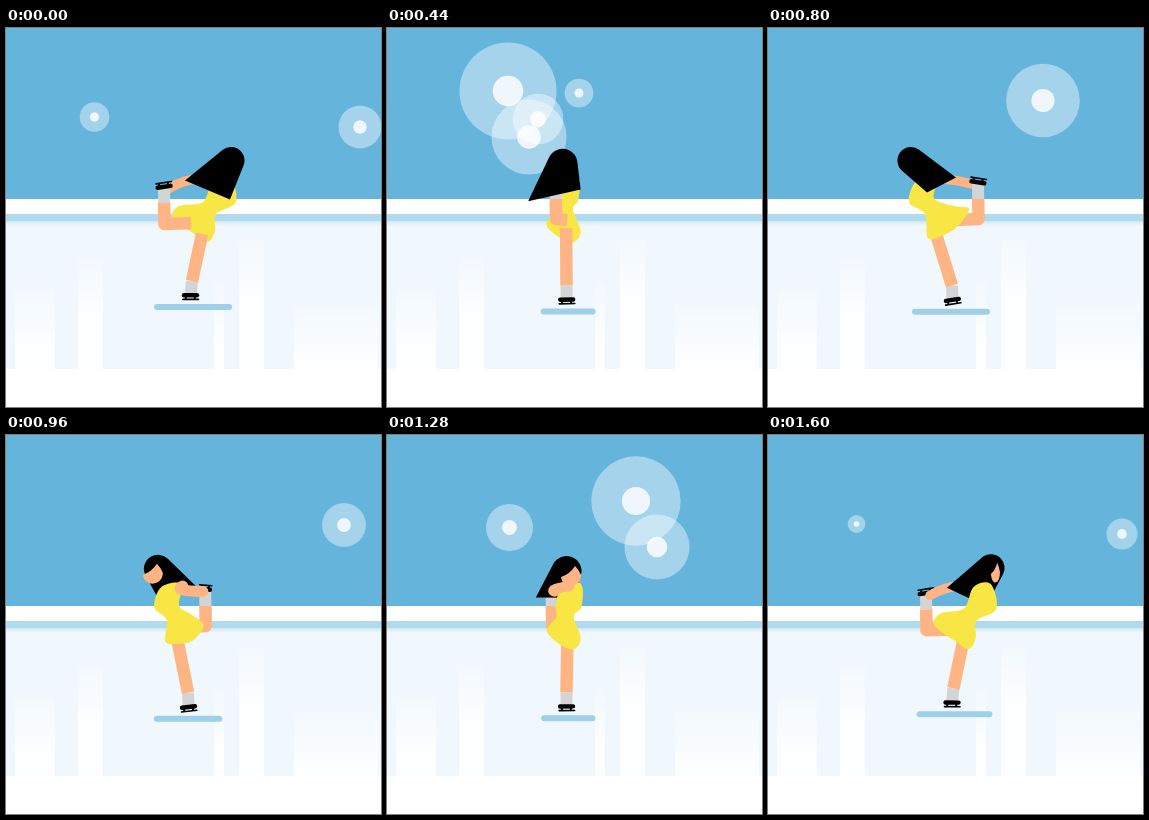
An HTML page with a canvas that plays this animation: 375x379 px, repeating every 1640 ms.

```html
<!DOCTYPE html>
<html lang="en">
<head>
<meta charset="utf-8">
<title>Skater spin</title>
<style>
  html, body { margin: 0; width: 100%; height: 100%; overflow: hidden; background: #fff; }
  canvas { display: block; width: 375px; height: 379px; }
</style>
</head>
<body>
<canvas id="stage" width="375" height="379"></canvas>
<script>
const ctx = document.getElementById('stage').getContext('2d');
const W = 375, H = 379, LOOP = 1640, STEP = 40;
const SKIN = '#ffb484', DRESS = '#f8e644', SOCK = '#d3d4d5', BLACK = '#000';

// Key moments of the spin: time, body lean, side of the raised leg
// (both -1 left to 1 right), right hair tip x, left hair tip x and y from the head.
const KEYS = [
  [0, 1, -1, -1, -46, 20],
  [240, .24, -1, 10, -28, 33],
  [600, -.54, 0, 26, -39, 39],
  [800, -1, 1, 45, 16, 32],
  [1160, -.3, -.3, 26, -24, 35],
  [1400, .12, -1, -8, -36, 18],
  [1600, .95, -1, -5, -44, 20]
];

// Flashes: x, y, start time. All grow alike.
const LIGHTS = [
  [88.5, 89, 1540], [354, 99, 1495], [282, 110, 78], [121, 63, 112],
  [142, 109, 186], [151, 91, 269], [192, 65, 343], [275, 72.5, 551],
  [338, 90, 812], [249, 66, 978], [270, 112, 1060], [122.5, 92.5, 1121]
];
const GROWTH = .148, MAX_R = 51;

const N = KEYS.length;
const span = i => (KEYS[(i + 1) % N][0] - KEYS[i][0] + LOOP) % LOOP;
const slope = (i, k) => (KEYS[(i + 1) % N][k] - KEYS[i][k]) / span(i);

// Tangent that never overshoots a neighbouring key.
function tangent(i, k) {
  const a = slope((i + N - 1) % N, k), b = slope(i, k);
  return a * b > 0 ? 2 * a * b / (a + b) : 0;
}

function sample(t) {
  let i = N - 1;
  while (KEYS[i][0] > t) i--;
  const j = (i + 1) % N, h = span(i), u = (t - KEYS[i][0]) / h;
  const u2 = u * u, u3 = u2 * u, s = 3 * u2 - 2 * u3;
  return KEYS[i].map((v, k) => v + (KEYS[j][k] - v) * s +
    h * ((u3 - 2 * u2 + u) * tangent(i, k) + (u3 - u2) * tangent(j, k)));
}

function rect(x, y, w, h, fill) {
  ctx.fillStyle = fill;
  ctx.fillRect(x, y, w, h);
}

function disc(x, y, r, fill) {
  ctx.fillStyle = fill;
  ctx.beginPath();
  ctx.arc(x, y, r, 0, 2 * Math.PI);
  ctx.fill();
}

function line(pts, width, color, cap = 'butt') {
  ctx.strokeStyle = color;
  ctx.lineWidth = width;
  ctx.lineCap = cap;
  ctx.lineJoin = 'round';
  ctx.beginPath();
  for (let i = 0; i < pts.length; i += 2) ctx.lineTo(pts[i], pts[i + 1]);
  ctx.stroke();
}

function fade(y0, y1, from, to) {
  const g = ctx.createLinearGradient(0, y0, 0, y1);
  g.addColorStop(0, from);
  g.addColorStop(1, to);
  return g;
}

function drawRink() {
  rect(0, 0, W, 171, '#64b4dc');
  rect(0, 171, W, 15, '#fff');
  rect(0, 186, W, 7, '#afdbed');
  rect(0, 193, W, 148, '#f1f8fd');
  rect(0, 193, W, 5, fade(193, 198, '#d3e8f4', '#f1f8fd'));
  rect(0, 341, W, 38, '#fff');
  for (const [x, w, y] of [[9, 40, 255], [72, 25, 225], [208, 10, 250], [233, 25, 205], [288, 84, 270]])
    rect(x, y, w, 341 - y, fade(y, y + 60, 'rgba(255,255,255,0)', 'rgba(255,255,255,.8)'));
}

function drawLights(t) {
  for (const [x, y, start] of LIGHTS) {
    const r = (t - start + LOOP) % LOOP * GROWTH;
    if (r > MAX_R) continue;
    disc(x, y, r, 'rgba(255,255,255,.41)');
    disc(x, y, r * .315, 'rgba(255,255,255,.82)');
  }
}

function drawSkate(x, y, tilt, half, dir) {
  ctx.save();
  ctx.translate(x, y);
  ctx.rotate(tilt);
  ctx.scale(1, dir);
  line([2 - half, -.8, half - 2, -.8], 4.4, BLACK, 'round');
  line([1 - half, 3.3, half - .5, 3.3], 1.6, BLACK, 'round');
  for (const x of [-half * .55, half * .5]) line([x, 0, x, 3], 2, BLACK);
  ctx.restore();
}

function drawLeg(hip, ankle, foot, knee = []) {
  line([...ankle, ...foot], 12, SOCK);
  line([...hip, ...knee, ...ankle], 12.5, SKIN);
}

// Closed smooth curve through all points.
function blob(p, fill) {
  const n = p.length, at = k => p[(k + n) % n];
  ctx.fillStyle = fill;
  ctx.beginPath();
  ctx.moveTo(p[0], p[1]);
  for (let i = 0; i < n; i += 2) {
    const out = k => at(i + k) + (at(i + 2 + k) - at(i - 2 + k)) / 6;
    const into = k => at(i + 2 + k) - (at(i + 4 + k) - at(i + k)) / 6;
    ctx.bezierCurveTo(out(0), out(1), into(0), into(1), at(i + 2), at(i + 3));
  }
  ctx.fill();
}

// Round head with tangents running to the two hair tips.
function drawHair(x, y, r, rx, ry, lx, ly) {
  const edge = (dx, dy, side) =>
    Math.atan2(dy, dx) + side * Math.acos(Math.min(1, r / Math.hypot(dx, dy)));
  ctx.fillStyle = BLACK;
  ctx.beginPath();
  ctx.arc(x, y, r, edge(lx, ly, 1), edge(rx, ry, -1));
  ctx.lineTo(x + rx, y + ry);
  ctx.lineTo(x + lx, y + ly);
  ctx.fill();
}

function drawFace(x, y, w) {
  ctx.save();
  ctx.translate(x, y);
  ctx.scale(w, 1);
  ctx.fillStyle = SKIN;
  ctx.beginPath();
  ctx.moveTo(4, -10);
  ctx.quadraticCurveTo(-1, -2, -10, 1);
  ctx.bezierCurveTo(-9, 13, 10, 13, 10, -1);
  ctx.quadraticCurveTo(8, -6, 4, -10);
  ctx.fill();
  ctx.restore();
}

// Every joint follows from the lean and the raised leg.
function drawSkater(t) {
  const [, lean, leg, rightTip, leftTip, leftDrop] = sample(t);
  const bend = lean * lean, dip = Math.max(0, lean) ** 3;
  const kick = Math.max(0, leg), tuck = 1 - Math.abs(leg);
  const front = t >= 900;
  const headX = 184 + 41 * lean, headY = 136 - 3.5 * bend;
  const kneeX = 184.5 + 26 * leg;
  const lift = [kneeX - .5, 153.5 + 4.5 * dip];
  const stand = [179.5 + 5 * bend, 272 - 2.3 * lean - 1.6 * bend];

  const mark = () => {
    const x = 181.5 + 2 * lean + 3.5 * bend, y = stand[1] + 11, half = 24 + 12 * bend;
    line([x - half, y, x + half, y], 6, '#9fd0e9', 'round');
  };
  const legs = () => {
    drawLeg([182 + 14 * lean, 200 + 6 * bend],
      [179.5 + lean + 5.5 * bend, stand[1] - 15], [stand[0], stand[1] - 1]);
    drawSkate(...stand, .08 * (lean - bend), 8.5, 1);
    drawLeg([180 + 5 * bend, 192 + 3 * dip], [kneeX - .3, 171 + 4 * dip],
      lift, [kneeX, 191 + 5 * dip]);
    drawSkate(...lift, .15 * leg, 4.5 + 4 * Math.abs(leg), -1);
  };
  const dress = () => blob([
    178 + 29 * lean, 152,
    197 + 27 * lean, 149,
    198 + 32 * lean, 172 + 2 * lean,
    188 + 12 * lean + 10 * bend, 182 + 4 * lean,
    194 + 4 * lean + 11 * bend, 203 - 22 * kick,
    188 + 6 * lean + 8 * bend, 214 - 16 * kick,
    176 + 7 * lean + 7 * bend, 211 - 4 * bend,
    160 + 3.5 * lean + 3.5 * bend, 200 + 6 * leg - 4 * lean,
    170 + 8 * lean - 5 * bend, 182 - 4 * lean,
    172 + 28 * lean - 3 * bend, 169 + 5 * bend
  ], DRESS);
  const arm = () => {
    const hand = lift[0] - 4 * leg, shoulder = 183 + 8 * lean;
    ctx.strokeStyle = SKIN;
    ctx.lineWidth = 9.5 + 3.5 * tuck;
    ctx.lineCap = 'round';
    ctx.beginPath();
    ctx.moveTo(hand, lift[1] + 3);
    ctx.quadraticCurveTo((hand + shoulder) / 2 - 50 * tuck, 152 + 9 * tuck, shoulder, 151);
    ctx.stroke();
  };
  const hair = () =>
    drawHair(headX, headY, 15 - 1.5 * bend, rightTip, 28 + 11 * lean, leftTip, leftDrop);
  const face = () => {
    const w = Math.min(1, 3 * Math.sin(Math.PI * (t - 800) / (LOOP - 800)));
    drawFace(headX + 4.5 - 20 * Math.max(0, -lean - .3), headY + 5, w);
  };

  const order = front
    ? lean < .6 ? [legs, hair, dress, face, arm] : [legs, arm, hair, dress, face]
    : leg < .5 ? [arm, dress, legs, hair] : [arm, legs, dress, hair];
  for (const draw of [mark, ...order]) draw();
}

const start = performance.now();

function frame() {
  const t = Math.floor((performance.now() - start) % LOOP / STEP) * STEP;
  drawRink();
  drawLights(t);
  drawSkater(t);
  requestAnimationFrame(frame);
}
frame();
</script>
</body>
</html>
```
